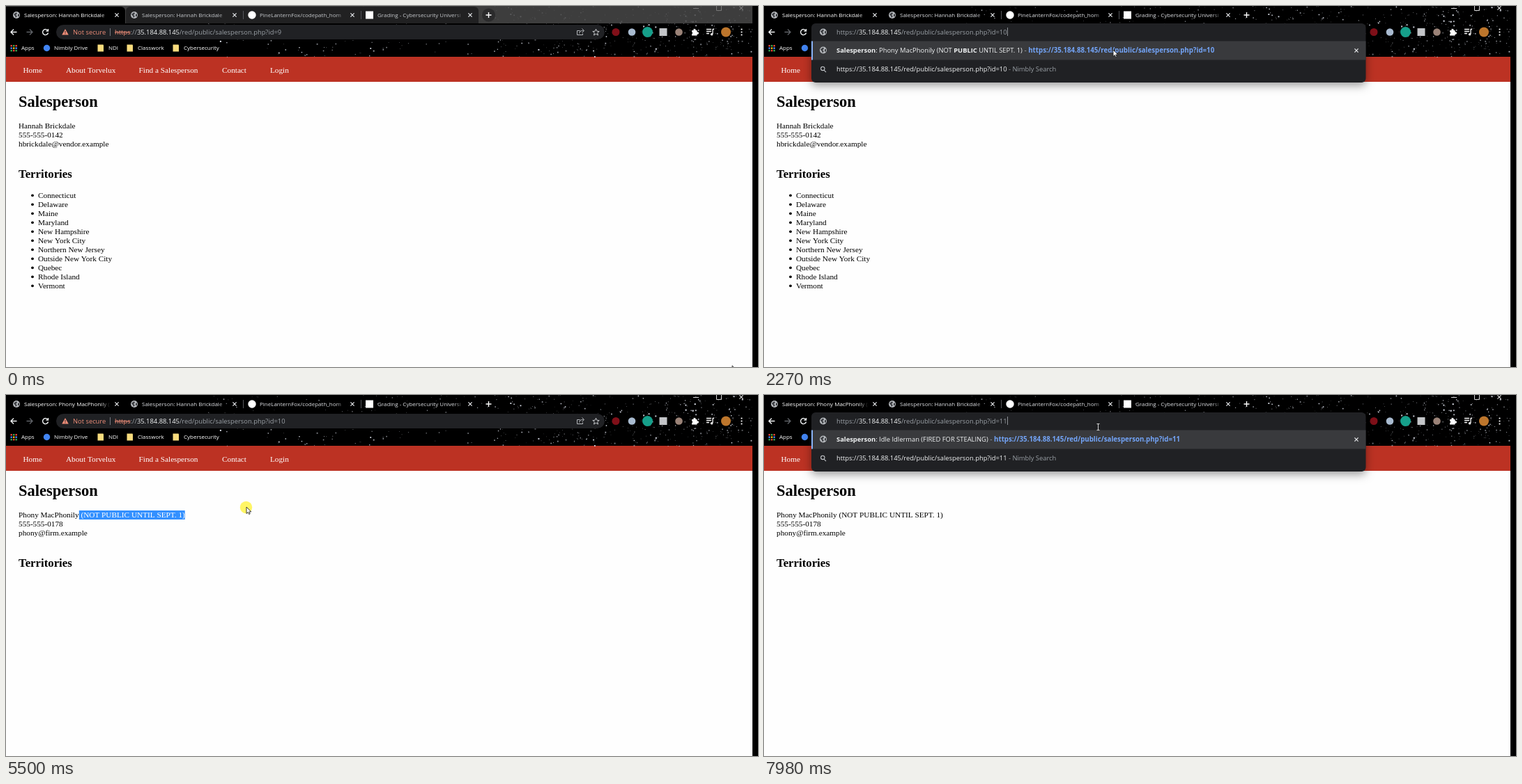
An HTML page with a canvas for the animation above (8 s loop, 1079x519 px).

```html
<!DOCTYPE html>
<html lang="en">
<head>
<meta charset="utf-8">
<title>Salesperson</title>
<style>
html, body { margin: 0; width: 100%; height: 100%; overflow: hidden; background: #000; }
canvas { display: block; }
</style>
</head>
<body>
<canvas id="stage" width="1079" height="519"></canvas>
<script>
const c = document.getElementById('stage').getContext('2d');
const LOOP = 8000;
const SANS = '"Open Sans", "Noto Sans", sans-serif';
const SERIF = '"Liberation Serif", "Times New Roman", serif';
const GREY = '#9aa0a6', DARK = '#202124', BLUE = '#73a4f7', WARN = '#ee8d78';
const HOST = '35.184.88.145', PATH = '/red/public/salesperson.php?id=';
const URL_TEXT = 'https://' + HOST + PATH;

const PEOPLE = [
  { name: 'Hannah Brickdale', note: '', phone: '555-555-0142', mail: 'hbrickdale@vendor.example',
    areas: ['Connecticut', 'Delaware', 'Maine', 'Maryland', 'New Hampshire', 'New York City',
      'Northern New Jersey', 'Outside New York City', 'Quebec', 'Rhode Island', 'Vermont'] },
  { name: 'Phony MacPhonily', note: ' (NOT PUBLIC UNTIL SEPT. 1)', phone: '555-555-0178',
    mail: 'phony@firm.example', areas: [] }
];
// Asterisks mark bold parts
const HINTS = {
  10: '*Salesperson*: Phony MacPhonily (NOT *PUBLIC* UNTIL SEPT. 1)',
  11: '*Salesperson*: Idle Idlerman (FIRED FOR STEALING)',
  12: 'Find a *Salesperson*'
};
const STEPS = [
  [0, { id: '9', auto: '', page: 0, rows: null, alpha: 1, focus: false, all: false, awake: false }],
  [790, { focus: true, all: true, awake: true }],
  [870, { all: false }],
  [1040, { id: '' }],
  [1860, { id: '1', auto: '2', rows: ['12', '', '11', '10'], alpha: .87 }],
  [1940, { alpha: 1 }],
  [2270, { id: '10', auto: '', rows: ['10', ''] }],
  [2520, { focus: false, rows: null }],
  [2600, { page: 1 }],
  [5910, { focus: true, all: true }],
  [6160, { all: false }],
  [7160, { id: '1' }],
  [7400, { auto: '0' }],
  [7490, { rows: ['10', '', '11', '12'], alpha: .87 }],
  [7570, { id: '11', auto: '', rows: ['11', ''], alpha: 1 }]
];
const POINTER = [
  [0, 1042, 517], [80, 1042, 517], [790, 455, 40], [870, 453, 44], [1450, 453, 44], [1530, 501, 63],
  [2600, 501, 63], [3120, 46, 197], [3200, 46, 197], [3280, 116, 205], [3480, 290, 214],
  [3680, 258, 173], [4160, 118, 175], [4420, 112, 176], [4840, 112, 175], [5080, 101, 173],
  [5250, 101, 173], [5500, 345, 161], [5600, 345, 161], [5910, 445, 33], [5990, 464, 8],
  [6160, 460, 36], [6400, 459, 31], [6900, 459, 31], [6910, 459, 37], [7810, 459, 37],
  [7980, 479, 46], [8000, 479, 46]
];
const CLICKS = [[750, 870], [3680, 3760], [5460, 5600], [5870, 5950], [6120, 6200]];

function rect(x, y, w, h, color) { c.fillStyle = color; c.fillRect(x, y, w, h); }
function round(x, y, w, h, r, color) {
  c.fillStyle = color;
  c.beginPath(); c.roundRect(x, y, w, h, r); c.fill();
}
function disc(x, y, r, color) {
  c.fillStyle = color;
  c.beginPath(); c.arc(x, y, r, 0, 7); c.fill();
}
function stroke(path, color, width = 1.3, x = 0, y = 0) {
  c.save(); c.translate(x, y);
  c.strokeStyle = color; c.lineWidth = width;
  c.stroke(new Path2D(path));
  c.restore();
}
function fill(path, color, x, y) {
  c.save(); c.translate(x, y);
  c.fillStyle = color; c.fill(new Path2D(path));
  c.restore();
}
// Draws text and returns its right edge
function text(s, x, y, color, font) {
  c.font = font; c.fillStyle = color;
  c.fillText(s, x, y);
  return x + c.measureText(s).width;
}
const ui = (s, x, y, color, size = 9.37, weight = 400) => text(s, x, y, color, `${weight} ${size}px ${SANS}`);
const serif = (s, x, y, color = '#000', size = 11.25, weight = 400) =>
  text(s, x, y, color, `${weight} ${size}px ${SERIF}`);

function globe(x, y) {
  disc(x, y, 5, '#b5b8bc');
  fill('M-4 -1 Q-2 -3 0 -4 L1 -2 L-1 0 L1 1.5 L-1 4 L-2 1.5Z M2 -1 L4 -2 L4 2 L2 2Z', '#3c3e42', x, y);
}
function closeMark(x, y, color = '#e8eaed') {
  stroke('M-2.6 -2.6 L2.6 2.6 M2.6 -2.6 L-2.6 2.6', color, 1.2, x, y);
}

function stars() {
  let seed = 71;
  const rnd = () => (seed = seed * 16807 % 2147483647) / 2147483647;
  for (let i = 0; i < 620; i++) {
    const x = i % 4 ? 700 + rnd() * 371 : 290 + rnd() * 420;
    const y = rnd() * 73, size = .6 + rnd() ** 3 * 1.5;
    c.globalAlpha = .3 + rnd() * .7;
    rect(x, y, size, size, '#e9edf8');
  }
  c.globalAlpha = 1;
}

function tab(i, title, active, awake) {
  const x = i * 169 + 26, end = x + 124;
  const shade = c.createLinearGradient(end - 14, 0, end, 0);
  const rgb = active ? '255,255,255' : awake ? '222,224,228' : '196,199,203';
  shade.addColorStop(0, `rgb(${rgb})`);
  shade.addColorStop(1, `rgba(${rgb},0)`);
  if (i < 2) globe(x - 11, 13);
  else if (i === 2) disc(x - 11, 13, 5.7, '#fff');
  else rect(x - 17, 7.5, 11, 11, '#fff');
  ui(title, x, 16, shade, 8);
  closeMark(x + 133, 13);
  if (i && i < 3) rect(x + 145, 7, 1, 12, '#55575b');
}

function tabStrip(s) {
  if (!s.awake) {
    c.globalAlpha = .86;
    rect(0, 0, 1071, 25, '#484848');
    c.globalAlpha = 1;
    round(172, 1, 506, 24, [6, 6, 0, 0], '#212122');
    round(0, 1, 171, 24, [0, 6, 0, 0], '#000');
    disc(692.5, 13, 9.5, '#2b2b2c');
  }
  const titles = ['Salesperson: ' + PEOPLE[s.page].name + PEOPLE[s.page].note.slice(0, 4),
    'Salesperson: ' + PEOPLE[0].name, 'PineLanternFox/codepath_hom', 'Grading - Cybersecurity Universi'];
  titles.forEach((title, i) => tab(i, title, i === 0, s.awake));
  stroke('M-4 0 H4 M0 -4 V4', '#fff', 1.4, 692.5, 13);
  const ink = s.awake ? '#d5d5d5' : '#777';
  stroke('M986 3.5 h8 M1019.5 -1 v7.5 h7 v-7.5', ink, 1);
  closeMark(1055, 3, ink);
}

function toolbar() {
  stroke('M4.5 0 H-4 M0 -4 L-4 0 L0 4', '#f1f3f4', 1.4, 11, 37.5);
  stroke('M-4.5 0 H4 M0 -4 L4 0 L0 4', '#606368', 1.3, 34, 37.5);
  stroke('M3.4 -2.2 A4 4 0 1 0 4 1 M4 -4.6 V-1.4 H.8', '#f1f3f4', 1.4, 56.5, 37.5);
  disc(875, 37.5, 5.5, '#800f18');
  disc(898, 37.5, 5.3, '#a9bbd0');
  disc(920.5, 37.5, 7.5, '#16a08b');
  rect(937.5, 32, 11, 11, '#c3c5c8');
  disc(965.5, 37.5, 5.3, '#9b8378');
  fill('M-4 -2.5 H-1.6 A1.7 1.7 0 1 1 1.6 -2.5 H3.5 V0 A1.7 1.7 0 1 1 3.5 3 V5 H-4 V2.8 A1.6 1.6 0 0 0 -4 -.2Z', '#fff', 988, 37.5);
  stroke('M-5 -4 H2 M-5 -1 H2 M-5 2 H-1 M4 -4 V3 M3.5 -4 H6', '#fff', 1.3, 1010, 37.5);
  disc(1012.5, 40.8, 1.7, '#fff');
  disc(1033, 37.5, 7, '#bd762c');
  for (const dy of [-4, 0, 4]) disc(1055.5, 37.5 + dy, 1.1, '#fff');
}

function bookmarks() {
  const tints = ['#ea4335', '#fbbc04', '#34a853', '#4285f4'];
  for (let i = 0; i < 9; i++) rect(6.5 + i % 3 * 3.5, 56 + (i / 3 | 0) * 3.5, 2.4, 2.4, tints[(i * 2 + (i / 3 | 0)) % 4]);
  ui('Apps', 22, 63, '#fff', 8);
  disc(58.5, 60.5, 4.7, '#4285f4');
  ui('Nimbly Drive', 69, 63, '#fff', 8);
  [['NDI', 147], ['Classwork', 189], ['Cybersecurity', 255]].forEach(([label, x]) => {
    fill('M-4 -5 H3.5 Q4.5 -5 4.5 -4 V5 H-4Z', '#f8dc7d', x - 11.5, 60.5);
    ui(label, x, 63, '#fff', 8);
  });
}

function address(s) {
  let x;
  if (!s.focus) {
    fill('M0 -4.5 L4.8 4 H-4.8Z', WARN, 85, 37.5);
    rect(84.5, 36, 1, 2.5, DARK);
    rect(84.5, 39.3, 1, 1, DARK);
    ui('Not secure', 96, 41, WARN);
    rect(149, 32, 1, 11, '#76797e');
    x = ui('https', 156, 41, WARN);
    rect(156, 37.5, x - 156, 1, WARN);
    x = ui('://', x, 41, GREY);
    x = ui(HOST, x, 41, '#f1f3f4');
    ui(PATH + s.id, x, 41, GREY);
    stroke('M-1 -2 H-5 V4 H3 V2 M-2 2 Q-2 -2 2 -2 H4 M2 -5 L5 -2 L2 1', '#b6b9bd', 1, 824.5, 37.5);
    stroke('M0 -4.7 L1.4 -1.5 L4.7 -1.3 L2.1 .9 L3 4.2 L0 2.4 L-3 4.2 L-2.1 .9 L-4.7 -1.3 L-1.4 -1.5Z', '#c8cacd', 1, 846.5, 37.8);
    return;
  }
  globe(85, 37.5);
  c.font = `400 9.37px ${SANS}`;
  if (s.all) rect(104, 31, c.measureText(URL_TEXT + s.id).width, 14, '#56748f');
  x = ui('https://', 104, 41, GREY);
  x = ui(HOST, x, 41, '#f1f3f4');
  x = ui(PATH + s.id, x, 41, GREY);
  if (s.auto) {
    rect(x, 30.5, c.measureText(s.auto).width, 14, '#5b7c9c');
    ui(s.auto, x, 41, '#dfe3e8');
  } else if (!s.all) rect(Math.round(x), 31, 1, 12, '#8d9095');
}

function hintRow(id, y, s) {
  let x = 104;
  if (!id) {
    stroke('M1.2 1.2 L4 4 M2 -1.2 A2.7 2.7 0 1 1 -3.4 -1.2 A2.7 2.7 0 1 1 2 -1.2', '#c5c8cc', 1.1, 85, y - 3);
    x = ui(URL_TEXT + s.id, x, y, '#f1f3f4');
    ui(' - Nimbly Search', x, y, GREY);
    return;
  }
  globe(85, y - 3.5);
  const label = s.auto ? HINTS[id].replace('SEPT. 1', 'SEPT. *1*') : HINTS[id];
  label.split('*').forEach((part, i) => x = ui(part, x, y, '#f1f3f4', 9.37, i % 2 ? 700 : 400));
  x = ui(' - ', x, y, GREY, 10);
  x = ui(URL_TEXT + (s.auto ? '1' : id), x, y, BLUE, 9.7, 700);
  if (s.auto) ui(id.slice(-1), x, y, BLUE);
}

function dropdown(s) {
  const h = 25 + s.rows.length * 27 + 6;
  c.save();
  c.globalAlpha = s.alpha;
  c.shadowColor = 'rgba(0,0,0,.4)';
  c.shadowBlur = 13;
  c.shadowOffsetY = 4;
  round(68, 25, 795.5, h, 6, DARK);
  c.restore();
  c.globalAlpha = s.alpha;
  rect(68, 50.5, 795.5, 27, '#393a3d');
  rect(68, 50.5, 2, 27, '#8ab4f8');
  c.globalAlpha = 1;
  s.rows.forEach((id, i) => hintRow(id, 67 + i * 27.1, s));
  closeMark(850, 64);
}

function page(s, t, px) {
  rect(0, 73, 1071, 446, '#fefefe');
  rect(0, 73, 1071, 36, '#bc3223');
  [['Home', 24.5], ['About Torvelux', 86], ['Find a Salesperson', 190.5], ['Contact', 310], ['Login', 379]]
    .forEach(([label, x]) => serif(label, x, 95.5, '#fff'));
  const who = PEOPLE[s.page];
  serif('Salesperson', 18, 145, '#000', 22.5, 700);
  const start = serif(who.name, 18, 176);
  const end = serif(who.note, start, 176);
  if (t >= 3680 && t < 5580) {
    const left = t < 5080 ? Math.min(end, Math.max(start, px)) : start;
    c.save();
    c.beginPath(); c.rect(left, 166, end - left, 13); c.clip();
    rect(left, 166, end - left, 13, '#3390ff');
    serif(who.note, start, 176, '#fff');
    c.restore();
  }
  serif(who.phone, 18, 189);
  serif(who.mail, 18, 202);
  serif('Territories', 18, 247, '#000', 16.8, 700);
  who.areas.forEach((area, i) => {
    disc(38, 272.3 + i * 13, 1.9, '#000');
    serif(area, 46, 275.5 + i * 13);
  });
}

function pointerAt(t) {
  const i = POINTER.findIndex(p => p[0] > t);
  const [t0, x0, y0] = POINTER[i - 1], [t1, x1, y1] = POINTER[i];
  const k = (t - t0) / (t1 - t0), e = k * k * (3 - 2 * k);
  return [x0 + (x1 - x0) * e, y0 + (y1 - y0) * e];
}

function pointer(t, x, y) {
  if (CLICKS.some(([a, b]) => t >= a && t < b)) disc(x - .5, y + .5, 8.7, 'rgba(255,242,50,.75)');
  const inBar = y > 27 && y < 49 && x < 820;
  const onText = x < 300 && y > 163 && y < 222;
  if (inBar || onText)
    stroke('M-2 -4.5 H2 M0 -4.5 V4.5 M-2 4.5 H2', inBar ? '#d4d4d4' : '#222', 1, Math.round(x) + .5, Math.round(y));
  else {
    const arrow = 'M0 0 V9.5 L2.2 7.5 L3.7 10.5 L5.2 9.8 L3.8 6.9 H6.8Z';
    fill(arrow, '#fff', x, y);
    stroke(arrow, '#111', .8, x, y);
  }
}

function draw(now) {
  const t = now % LOOP;
  const s = Object.assign({}, ...STEPS.filter(step => step[0] <= t).map(step => step[1]));
  const [px, py] = pointerAt(t);
  rect(0, 0, 1079, 519, '#000');
  page(s, t, px);
  stars();
  tabStrip(s);
  toolbar();
  bookmarks();
  if (s.rows) dropdown(s);
  else round(72, 27, 787, 21, 10.5, DARK);
  address(s);
  pointer(t, px, py);
  rect(1071, 0, 8, 519, '#000');
  requestAnimationFrame(draw);
}
requestAnimationFrame(draw);
</script>
</body>
</html>
```
